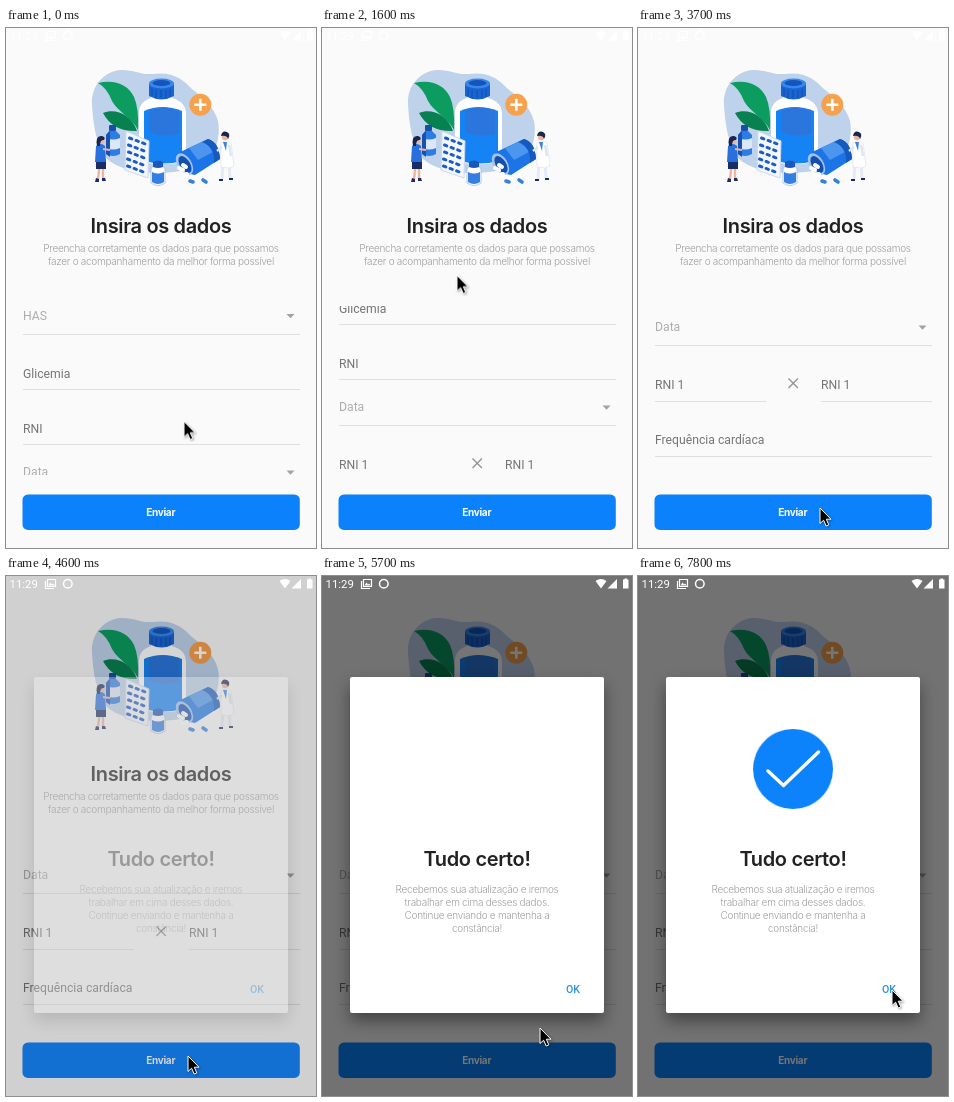
Write an HTML page that moves like this. It is 310 px wide and 520 px high and loops after 8000 ms.

```html
<!DOCTYPE html>
<html lang="pt-BR">
<head>
<meta charset="utf-8">
<title>Insira os dados</title>
<style>
html, body { margin: 0; width: 100%; height: 100%; overflow: hidden; background: #fafafa; }
svg { display: block; width: 310px; height: 520px; }
text { font-family: Roboto, sans-serif; }

.title, .note, .send { font-family: Inter, sans-serif; text-anchor: middle; }
.title { font-size: 20px; font-weight: 600; letter-spacing: -.35px; fill: #212124; }
.note { font-size: 10px; font-weight: 300; letter-spacing: -.28px; fill: #a0a0a0; }
.send { font-size: 10px; font-weight: 700; letter-spacing: -.3px; fill: #fff; }
.field { font-size: 12.2px; fill: #757575; }
.hint { fill: #aeaeae; }
.rule { stroke: #dfdfdf; fill: none; }
.ok { font-size: 10.6px; font-weight: 500; fill: #2c92dc; }
.clock { font-size: 11.4px; }

.list, .glow, .ripple, .dim, .dialog, .disc, .tick, .cursor {
  animation: 8s linear infinite;
}
.list { animation-name: scroll; }
.glow { animation-name: glow; transform-origin: 155px 447px; }
.ripple { animation-name: ripple; transform-origin: 182px 480px; }
.dim, .dialog { animation-name: appear; }
.disc { animation-name: pop; transform-origin: 155px 193px; }
.tick { animation-name: draw; stroke-dasharray: 1 2; }
.cursor { animation-name: point; filter: drop-shadow(1px 1px 1px #0005); }

@keyframes scroll {
  0%, 11.6% { transform: translateY(0); }
  20%, 20.9% { transform: translateY(-65px); }
  28.4%, 100% { transform: translateY(-145px); }
}
@keyframes glow {
  0%, 28.4% { transform: scaleY(0); opacity: 0; }
  31.25%, 33.5% { transform: scaleY(1); opacity: 1; }
  41%, 100% { transform: scaleY(0); opacity: 0; }
}
@keyframes ripple {
  0%, 52.4% { transform: scale(0); opacity: .16; }
  55% { transform: scale(1); opacity: .16; }
  58.5%, 100% { transform: scale(1); opacity: 0; }
}
@keyframes appear {
  0%, 56% { opacity: 0; }
  57.5%, 58.6% { opacity: .31; }
  61%, 100% { opacity: 1; }
}
@keyframes pop {
  0%, 78.75% { transform: scale(0); animation-timing-function: ease-out; }
  83.75% { transform: scale(1.1); animation-timing-function: ease-in-out; }
  86.5%, 100% { transform: scale(1); }
}
@keyframes draw {
  0%, 86.4% { stroke-dashoffset: 1; opacity: 0; }
  86.5% { stroke-dashoffset: 1; opacity: 1; animation-timing-function: ease-in-out; }
  91.25%, 100% { stroke-dashoffset: 0; opacity: 1; }
}
@keyframes point {
  0%, 1.25% { transform: translate(178px, 393.5px); animation-timing-function: ease-in-out; }
  7.5%, 10% { transform: translate(137px, 325px); }
  20%, 20.9% { transform: translate(135px, 247.5px); }
  31.25% { transform: translate(142px, 137px); }
  33.5% { transform: translate(142px, 137px); animation-timing-function: ease-in-out; }
  42.5%, 68.1% { transform: translate(182px, 480px); }
  71.25%, 72.4% { transform: translate(218px, 452px); }
  76.25%, 100% { transform: translate(254px, 414px); }
}
</style>
</head>
<body>
<svg viewBox="0 0 310 520">
  <defs>
    <clipPath id="view"><path d="M0 278H310V447H0z"/></clipPath>
    <clipPath id="button"><rect x="16.500" y="466.500" width="277.300" height="35.400" rx="5.500"/></clipPath>
    <linearGradient id="shine" x2="0" y2="1">
      <stop offset="0" stop-color="#e9f2fa"/>
      <stop offset="1" stop-color="#dcebf8"/>
    </linearGradient>
    <path id="arrow" d="M280.5 0h8l-4 4.200z" fill="#a2a2a2"/>
  </defs>
  <rect width="310" height="520" fill="#fafafa"/>

  <!-- Illustration -->
  <g>
    <path fill="#bfd2ec" d="M86 76C85 58 98 43 115 42C128 41.500 134 47 146 46C168 43 177 52 186 61C196 69 208 78 212 93C216 116 205 135 185 141C150 149 115 145 100 130C90 116 87 96 86 76z"/>
    <path fill="#0c9c60" d="M92 55C108 51 122 56 128 69Q133 80 132 102C126 90 112 84 106 73Q101 60 92 55z"/>
    <path fill="#07814f" d="M97 85C109 80 125 86 131 103Q107 104 97 85z"/>

    <!-- Tall bottle -->
    <path fill="#fff" d="M145 64h21v6c10 3 14 8 14 16v44c0 8-47 8-47 0V86c0-8 3-13 12-16z"/>
    <path fill="#1683f5" d="M138 83q18-8 38 0v50q-18 5-38 0z"/>
    <path fill="#2a76dc" d="M143 82q14-5 30 0v24q-15 4-30-2z"/>
    <path fill="#1a64d2" d="M143 55v13q12.500 7 25 0V55z"/>
    <ellipse cx="155.500" cy="55.500" rx="12.500" ry="5" fill="#3588ee"/>
    <ellipse cx="155.500" cy="55" rx="9" ry="3" fill="#1455bd"/>
    <path d="M146 61v7m4-6v8m5-8v8m5-8v8m4-9v8" stroke="#0f4cae" stroke-width="1"/>

    <circle cx="194.300" cy="76.700" r="11" fill="#f5a14e"/>
    <path d="M188.300 76.700h12m-6-6v12" stroke="#fff" stroke-width="2.600"/>

    <!-- Blister pack -->
    <path fill="#f4f7fd" stroke="#cbd8ee" d="M120 103l23 10-1 37-23-8z"/>
    <path d="M123.500 110l16 6m-17 1l16 6m-16 1l16 6m-17 1l16 6m-16 1l16 6" fill="none" stroke="#1c5bc6" stroke-width="3" stroke-linecap="round" stroke-dasharray="2.500 4.500"/>

    <!-- Held bottle and left figure -->
    <rect x="103" y="97" width="7" height="6" rx="1" fill="#174fa9"/>
    <path fill="#2c7ce6" d="M103 103h7l4 4v19q-7 4-14 0v-19z"/>
    <path fill="#dce8fa" d="M100 110q7 3 14 0v10q-7 3-14 0z"/>
    <path fill="#1b50ab" d="M100 107l4-4v26l-4-3z"/>
    <path d="M94 134l-2 17m5-17v17" stroke="#efb59f" stroke-width="2.400"/>
    <path fill="#1b2c62" d="M90 131h10v10H90zM90 150l3 1v3h-4zM96 150h3l1 3h-4z"/>
    <path fill="#2870dd" d="M90 118q5-4 9 0l1 16H89z"/>
    <path d="M97 121l7 1" stroke="#efb59f" stroke-width="2"/>
    <circle cx="95.500" cy="113" r="3" fill="#efb59f"/>
    <path fill="#18264f" d="M91 118q-2-11 5-10 4 1 2 4-4-1-4 6z"/>

    <!-- Small bottle -->
    <path fill="#fff" stroke="#9dbbe8" stroke-width=".8" d="M147 138h10l2 3v14q-7 5-14 0v-14z"/>
    <path fill="#357fe2" d="M146 144q6 3 12 0v10q-6 4-12 0z"/>
    <path fill="#1c58b9" d="M147 134q5-3 10 0v5q-5 2-10 0z"/>

    <!-- Tipped bottle with pills -->
    <path fill="#1c74e6" d="M170 126l32-15q11 3 12 20l-25 16q-15-2-19-21z"/>
    <path fill="#4c96f0" d="M183 120l15-7q7 4 9 11l-15 8z"/>
    <path fill="#155abf" d="M202 111q11 3 12 20l-6 4q1-16-12-21z"/>
    <ellipse cx="178.500" cy="136" rx="7" ry="12" transform="rotate(-32 178.500 136)" fill="#9dc3f7"/>
    <ellipse cx="179" cy="136.500" rx="5" ry="9.500" transform="rotate(-32 179 136.500)" fill="#154fae"/>
    <path d="M173 140l4 2m0 5l4-1m4 4l4 1m-12-14l3 2" stroke="#fff" stroke-width="4" stroke-linecap="round"/>
    <path d="M187 154l-3-1m13-1l3 2" stroke="#347fdf" stroke-width="3.600" stroke-linecap="round"/>

    <!-- Right figure -->
    <path d="M217 134l-1 17m7-17l1 16" stroke="#e4ebf6" stroke-width="3"/>
    <path d="M213 152h4m6-1h4" stroke="#172b60" stroke-width="2"/>
    <path fill="#fff" stroke="#d5dfed" stroke-width=".6" d="M215 115q5-4 10 0l3 23-5 2-8-1z"/>
    <path fill="#3d81df" d="M217 114h4l-1 9z"/>
    <path d="M216 119l-5 4m12-6l2 11" stroke="#dce5f2" stroke-width="2.400"/>
    <circle cx="219" cy="109" r="3.200" fill="#efb59f"/>
    <path fill="#18264f" d="M215 108q1-6 6-4 4 2 1 7-1-4-7-3z"/>
  </g>

  <text class="title" x="155" y="204.500">Insira os dados</text>
  <text class="note" x="155" y="223.500">Preencha corretamente os dados para que possamos</text>
  <text class="note" x="155" y="236.500">fazer o acompanhamento da melhor forma possível</text>

  <!-- Form -->
  <g clip-path="url(#view)">
    <g class="list">
      <path class="rule" d="M17 306.500h277M17 361.500h277M17 416.500h277M17 462.500h277M17 518.500h111m55 0h111M17 573.500h277"/>
      <text class="field hint" x="17" y="291.500">HAS</text>
      <text class="field" x="17" y="349.500">Glicemia</text>
      <text class="field" x="17" y="404.500">RNI</text>
      <text class="field hint" x="17" y="448.300">Data</text>
      <text class="field" x="17" y="506">RNI 1</text>
      <text class="field" x="183" y="506">RNI 1</text>
      <text class="field" x="17" y="561">Frequência cardíaca</text>
      <use href="#arrow" y="286"/>
      <use href="#arrow" y="442.500"/>
      <path d="M150.500 495.500l9.400 9.400m0-9.400l-9.400 9.400" stroke="#959595" stroke-width="1.400"/>
    </g>
    <path class="glow" fill="url(#shine)" d="M0 438q155-4 310 0v9H0z"/>
  </g>

  <g clip-path="url(#button)">
    <path fill="#0b82fb" d="M16 466h279v37H16z"/>
    <circle class="ripple" cx="182" cy="480" r="170" fill="#fff"/>
  </g>
  <text class="send" x="154.700" y="488">Enviar</text>

  <rect class="dim" width="310" height="520" fill-opacity=".54"/>

  <!-- Status bar -->
  <g fill="#fff">
    <text class="clock" x="3.500" y="12">11:29</text>
    <path fill="none" stroke="#fff" stroke-width="1.200" d="M41.500 3.500h8v7h-8zM39.500 5v7.500h8.500"/>
    <path d="M42.500 9.500l2-3 1.500 2 1-1 1.800 2z"/>
    <circle cx="61.800" cy="7.700" r="4.300" fill="none" stroke="#fff" stroke-width="1.500"/>
    <path d="M273.500 5q5.500-4 11 0l-5.500 7.500zM295 3v9.500h-9.500zM301 3.500h1.500v-1h2.500v1h1.500v9H301z"/>
  </g>

  <!-- Confirmation -->
  <g class="dialog">
    <rect x="28" y="101" width="254" height="336" rx="2" fill="#fff" style="filter:drop-shadow(0 8px 8px #0006)"/>
    <circle class="disc" cx="155" cy="193" r="40" fill="#0c83fb"/>
    <path class="tick" pathLength="1" d="M130 195l15.500 14.500L180.500 176" fill="none" stroke="#fff" stroke-width="3.400" stroke-linecap="round" stroke-linejoin="round"/>
    <text class="title" x="155" y="290">Tudo certo!</text>
    <text class="note" x="155" y="316.500">Recebemos sua atualização e iremos</text>
    <text class="note" x="155" y="329.500">trabalhar em cima desses dados.</text>
    <text class="note" x="155" y="342.500">Continue enviando e mantenha a</text>
    <text class="note" x="155" y="355.500">constância!</text>
    <text class="ok" x="244" y="416.800">OK</text>
  </g>

  <path class="cursor" d="M0 0V15.500L3.600 12.200 6.200 18 8.800 16.900 6.300 11.200H11z" stroke="#fff" stroke-width="1"/>
</svg>
</body>
</html>
```
